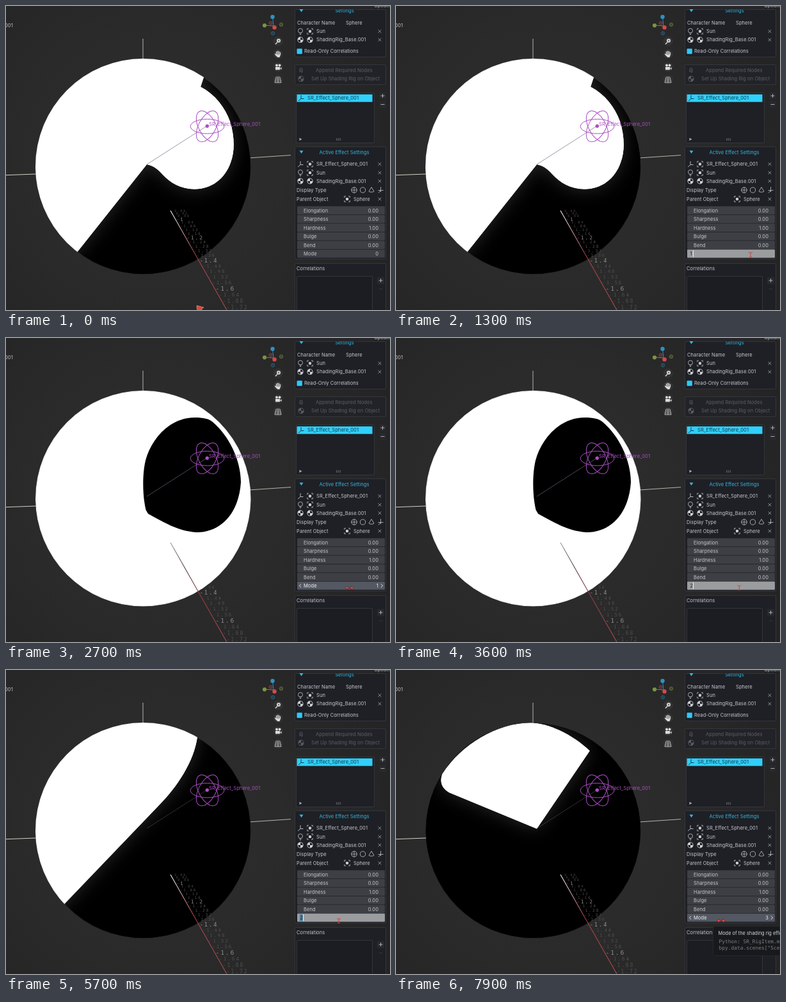
Animation of 600 by 474 pixels, one loop 8000 ms. Source, as an HTML page:

```html
<!DOCTYPE html>
<html lang="en">
<head>
<meta charset="utf-8">
<title>Shading rig modes</title>
<style>
html, body { margin: 0; width: 100%; height: 100%; overflow: hidden; background: #292929; }
svg { display: block; width: 600px; height: 474px; }
text { font: 7.5px Inter, "Open Sans", sans-serif; letter-spacing: .09px; fill: #c6c8cc; white-space: pre; }
.mono { font-family: "DejaVu Sans Mono", monospace; font-size: 7.9px; letter-spacing: 0; fill: #7c7f84; }
.ruler { font-family: "DejaVu Sans Mono", monospace; letter-spacing: 1.9px; }
.lit { filter: drop-shadow(0 0 .6px #fff) drop-shadow(0 0 14px rgba(255, 255, 255, .16)); }
</style>
</head>
<body>
<svg id="stage" viewBox="0 0 600 474" xmlns="http://www.w3.org/2000/svg">
  <defs>
    <radialGradient id="back" gradientUnits="userSpaceOnUse" cx="235" cy="240" r="390">
      <stop offset="0" stop-color="#2f2f2f"/><stop offset=".55" stop-color="#2a2a2a"/><stop offset="1" stop-color="#242425"/>
    </radialGradient>
    <linearGradient id="axis" gradientUnits="userSpaceOnUse" x1="257" y1="319" x2="345" y2="474">
      <stop offset="0" stop-color="#fff"/><stop offset=".2" stop-color="#d0a0a0"/>
      <stop offset=".42" stop-color="#a34247"/><stop offset="1" stop-color="#a84c50"/>
    </linearGradient>
    <linearGradient id="axisDark" gradientUnits="userSpaceOnUse" x1="257" y1="319" x2="345" y2="474">
      <stop offset="0" stop-color="#999"/><stop offset=".25" stop-color="#4c4044"/>
      <stop offset=".5" stop-color="#8d3c42"/><stop offset="1" stop-color="#a84c50"/>
    </linearGradient>
    <clipPath id="ball"><circle cx="214.3" cy="250.2" r="168.3"/></clipPath>
  </defs>
</svg>
<script>
const LOOP = 8000;
const stage = document.getElementById("stage");
const CYAN = "#36b8e0", PURPLE = "#a950c2", GREY = "#b4b6ba";

function add(tag, attrs, parent = stage, content) {
  const el = document.createElementNS("http://www.w3.org/2000/svg", tag);
  for (const k in attrs) el.setAttribute(k, attrs[k]);
  if (content !== undefined) el.textContent = content;
  parent.appendChild(el);
  return el;
}
const group = (parent = stage) => add("g", {}, parent);
const rect = (x, y, width, height, fill, more, parent) => add("rect", { x, y, width, height, fill, ...more }, parent);
const disc = (cx, cy, r, fill, more, parent) => add("circle", { cx, cy, r, fill, ...more }, parent);
const path = (d, stroke, more, parent) => add("path", { d, stroke, fill: "none", ...more }, parent);
const label = (x, y, s, more, parent) => add("text", { x, y, ...more }, parent, s);
const show = (el, on) => el.setAttribute("visibility", on ? "visible" : "hidden");

// Viewport and sphere
rect(0, 0, 600, 474, "url(#back)");
path("M214 51V82", "#b4b4b0");
path("M0 263.7L47 262", "#d0d1c6");
path("M381 236.900L445 232.600", "#b5b8aa");
label(-2, 32.5, "001", { fill: "#c4c4c4" });

const ball = add("g", { "clip-path": "url(#ball)" });
const base = disc(214.3, 250.2, 168.3, "#000", {}, ball);
const shades = [
  "M312 104L309 111L304 126C327 138 342 158 350 180C357 202 358 226 351 244C342 270 320 286 294 285.5C272 285 257 276 244 262C235 252 229 249 220 247L111 384L20 420V60H300Z",
  "M218.500 268C213 245 213 212 218 191C227 158 255 124 295 124C309 124 317 126 323 131C348 152 367 190 367 225C364 272 337 303 298 303C268 301 244 286 222 274Z",
  "M299 104C294 142 268 182 237 213L91 365L20 400V40H300Z",
  "M220 247.500L302.700 126C275 100 238 82.500 209 82.500C158 83 102 116 72.500 162C68 174 71 184 83 191Z"
].map((d, i) => path(d, "none", i === 1 ? { fill: "#000" } : { fill: "#fff", class: "lit" }, ball));
const rim = disc(214.3, 250.2, 167.9, "none", { stroke: "#bbb", "stroke-width": .7 });

// Perspective ruler
const axis = path("M257 319L345 474", "url(#axis)", { "stroke-width": 1.1 });
const marks = group();
marks.style.mixBlendMode = "lighten";
for (let k = 0; k <= 21; k++) {
  const y = 319 + 4 * k + .153 * k * k, x = 257 + (y - 319) * .568;
  const v = (88 + 4 * k) / 100, major = (88 + 4 * k) % 20 === 0;
  const size = (major ? 6.5 : 4.6) + k * .17;
  add("text", {
    x: x + 1.5, y: y + size * .36, class: "ruler",
    style: `font-size:${size}px;fill:${major ? "#8c8c8c" : "#4e4e4e"}`
  }, marks, "-" + (major ? +v.toFixed(1) : v.toFixed(2)));
}

// Effect handle
const link = path("M220 247L314 187", "#6f6780", { "stroke-width": .8 });
for (const a of [0, 62, -62])
  add("ellipse", { cx: 314.5, cy: 187.7, rx: 26.3, ry: a ? 13.5 : 11.3, fill: "none", stroke: PURPLE, transform: `rotate(${a} 314.5 187.7)` });
disc(314.3, 187.2, 2.7, PURPLE);
label(317, 187.3, "SR_Effect_Sphere_001", { style: "fill:" + PURPLE });

// Navigation gizmo
path("M418 31L404 30", "#6f8b3a", { "stroke-width": 1.2 });
path("M418 31L416.500 17", "#2b80a8", { "stroke-width": 1.2 });
path("M418 31L420 34", "#c2484d", { "stroke-width": 1.2 });
disc(430, 29, 2.7, "#3d4a2a", { stroke: "#62783a", "stroke-width": .8 });
disc(417, 42.500, 2.7, "#24404f", { stroke: "#2c6583", "stroke-width": .8 });
disc(413.500, 26.500, 2.5, "#55302f", { stroke: "#8f4045", "stroke-width": .8 });
disc(404, 30.300, 3.1, "#789640");
disc(416.500, 17, 3.2, "#2f92c2");
disc(419.500, 33.500, 3.2, "#d4494f");

// Navigation buttons
for (const y of [55, 75, 95, 115]) disc(425, y, 7.6, "#323233");
disc(426, 54, 3, "#ddd");
path("M424 56.500L421 59.500", "#ddd", { "stroke-width": 1.5 });
path("M424.500 54H427.500M426 52.500V55.500", "#444", { "stroke-width": .8 });
path("M422.500 76V71.500M424.500 75V70.500M426.500 75V71M428.500 76V72.500M420.500 75L423 78", "#ddd", { "stroke-width": 1.3, "stroke-linecap": "round" });
path("M422 75.500H429L427.500 80H424Z", "none", { fill: "#ddd" });
disc(423, 92.500, 2, "#ddd");
disc(427.500, 92.500, 2, "#ddd");
path("M421 95H428V99.500H421ZM428 97L430.500 95.500V99.500Z", "none", { fill: "#ddd" });
path("M422 111H428L430 119.500H420ZM421.300 114H428.700M420.700 117H429.300M425 111V119.500", "#ccc", { "stroke-width": .8 });

// Sidebar
const PANEL = "#1e2026", EDGE = "#34363b";
const box = (x, y, w, h, fill = PANEL, r = 1.5) => rect(x + .5, y + .5, w - 1, h - 1, fill, { stroke: EDGE, rx: r });
const cross = y => path(`M581.500 ${y - 2.3}L586.300 ${y + 2.3}M586.300 ${y - 2.3}L581.500 ${y + 2.3}`, "#a7a9ad", { "stroke-width": .8 });
const plus = (x, y) => path(`M${x - 3} ${y}H${x + 3}M${x} ${y - 3}V${y + 3}`, "#bbb", { "stroke-width": .9 });

function bulb(x, y) {
  disc(x, y - 1, 3.5, "none", { stroke: GREY, "stroke-width": .9 });
  path(`M${x - 1.5} ${y + 3.3}H${x + 1.5}M${x - 1} ${y + 5}H${x + 1}`, GREY, { "stroke-width": .9 });
}
function object(x, y) {
  rect(x - 2, y - 2, 4, 4, "#c8c8c8");
  path(`M${x - 4.3} ${y - 2}V${y - 4.3}H${x - 2}M${x + 2} ${y - 4.3}H${x + 4.3}V${y - 2}M${x + 4.3} ${y + 2}V${y + 4.3}H${x + 2}M${x - 2} ${y + 4.3}H${x - 4.3}V${y + 2}`, GREY, { "stroke-width": .9 });
}
function material(x, y, c = "#d2d2d2") {
  disc(x, y, 4.1, "none", { stroke: c, "stroke-width": .9 });
  path(`M${x} ${y - 4}A4 4 0 0 0 ${x - 4} ${y}H${x}ZM${x} ${y}H${x + 4}A4 4 0 0 1 ${x} ${y + 4}Z`, "none", { fill: c });
}
function empty(x, y, c = GREY) {
  path(`M${x} ${y - 4.5}V${y + 1}H${x + 4.5}M${x} ${y + 1}L${x - 4} ${y + 4.5}`, c, { "stroke-width": 1 });
}
function lightRow(y) {
  bulb(460, y); object(475, y);
  label(485, y + 2.7, "Sun"); cross(y);
}
function materialRow(y) {
  material(460, y); material(475, y);
  label(485, y + 2.7, "ShadingRig_Base.001"); cross(y);
}
const fold = y => path(`M458.500 ${y - 2}H464.500L461.500 ${y + 2.5}Z`, "none", { fill: CYAN });

label(575, 2.3, "Options");
box(451, 5, 143, 75);
rect(450, 0, 126, 5, "#262628");
fold(7);
label(529, 10, "Settings", { "text-anchor": "middle", style: "fill:" + CYAN });
rect(510, 2, 40, 3.5, "#262628");
label(455, 28.7, "Character Name");
label(531, 28.7, "Sphere");
lightRow(39.5);
materialRow(52.7);
rect(454.5, 66.5, 8.3, 8.3, "#2fc8f7", { rx: 1 });
label(466, 73.3, "Read-Only Correlations");

box(451, 91, 143, 32, "#212328");
const DIM = { style: "fill:#5c5f64" };
path("M459 103V99A1.800 1.800 0 0 1 463 99V102.500A1 1 0 0 1 461 102.500V99.500", "#5c5f64", { "stroke-width": .9 });
label(484, 103.2, "Append Required Nodes", DIM);
material(461, 113.5, "#5c5f64");
label(477, 116.2, "Set Up Shading Rig on Object", DIM);

box(453, 135, 123, 79);
rect(454.5, 137.8, 118, 11.8, "#2fd0fb");
empty(461, 143.5, "#153d4c");
label(471, 146.4, "SR_Effect_Sphere_001", { style: "fill:#123a49" });
rect(583, 134.5, 11, 11, "#27292e", { rx: 1 });
rect(583, 148, 11, 11, "#27292e", { rx: 1 });
plus(588.5, 140);
path("M585.500 153.500H591.500", "#bbb", { "stroke-width": .9 });
path("M458.500 205.500L462.500 207.700L458.500 210Z", "none", { fill: "#aaa" });
path("M516 207H523M516 209H523", "#85888d", { "stroke-dasharray": "1.5 1.2" });

box(451, 219, 143, 176);
fold(227.5);
label(528.5, 230.7, "Active Effect Settings", { "text-anchor": "middle", style: "fill:" + CYAN });
empty(460, 246.5); object(475, 246.5);
label(485, 249.2, "SR_Effect_Sphere_001"); cross(246.5);
lightRow(260);
materialRow(273);
label(454, 290, "Display Type");
disc(544, 287, 4.3, "none", { stroke: GREY, "stroke-width": .9 });
path("M539.500 287H548.500M544 282.500V291.500", GREY, { "stroke-width": .8 });
disc(557.500, 287, 4.1, "none", { stroke: GREY, "stroke-width": .9 });
path("M571 282.500L575 289A4.500 2.200 0 0 1 567 289Z", GREY, { "stroke-width": .9 });
path("M585.500 282V287.500H589.500M585.500 287.500H581.500M585.500 287.500L582 291.500M585.500 287.500V290", GREY, { "stroke-width": .9 });
label(454, 303.7, "Parent Object");
object(533, 301);
label(543, 303.7, "Sphere"); cross(301);

const rowY = i => 312.3 + i * 13.5;
const RIGHT = { "text-anchor": "end" };
let modeBar, modeText, modeName;
[["Elongation", "0.00"], ["Sharpness", "0.00"], ["Hardness", "1.00"], ["Bulge", "0.00"], ["Bend", "0.00"], ["Mode", "0"]].forEach(([name, value], i) => {
  modeBar = rect(455, rowY(i), 137, 12.7, "#3d3f45", { rx: 1 });
  modeName = label(465, rowY(i) + 9.2, name);
  modeText = label(582, rowY(i) + 9.2, value, RIGHT);
});
const arrows = path("M461 383.500L458.500 386.200L461 389M586 383.500L588.500 386.200L586 389", "#ddd", {});

box(451, 401, 143, 80);
label(454, 412.3, "Correlations");
box(454, 421, 119, 60, "#1b1d22");
rect(580, 422.5, 11, 11, "#27292e", { rx: 1 });
plus(585.5, 428);
path("M583 441H588", "#45484e", { "stroke-dasharray": "1 1" });

// Value being typed
const edit = group();
rect(455, 379.8, 137, 12.7, "#9b9c9e", { rx: 1 }, edit);
const picked = rect(459, 381, 5, 10.5, "#4f7f9f", {}, edit);
const typed = label(459.5, 389, "", { style: "fill:#222" }, edit);
rect(464, 381, 1, 10.5, "#f2f2f2", {}, edit);

// Tooltip
const tip = group();
rect(495.500, 399.500, 120, 46, "#17191c", { rx: 3, stroke: "#26282c" }, tip);
label(503.5, 412.5, "Mode of the shading rig effect", { style: "fill:#d2d3d5;letter-spacing:0;font-size:7.4px" }, tip);
label(504.5, 426, "Python: SR_RigItem.mode", { class: "mono" }, tip);
label(504.5, 436.3, "bpy.data.scenes[\"Scene\"]", { class: "mono" }, tip);

// Pointer shapes, drawn around 0,0
const pointers = {
  arrow: path("M-5 -4L6 -1L2.500 1.500L5 6L2 8L-1 3L-4 5Z", "#f0b0a0", { fill: "#e2452f", "stroke-width": .6 }),
  drag: path("M-6.500 0L-3 -2.500V-1H-1V1H-3V2.500ZM6.500 0L3 -2.500V-1H1V1H3V2.500Z", "#5a1a18", { fill: "#ee4a48", "stroke-width": .5 }),
  beam: path("M-3 -3.500Q0 -3.500 0 -1.500Q0 -3.500 3 -3.500M0 -2V3.500M-2 3.500H2", "#cc4540", { "stroke-width": 1 })
};

// [time, mode, value in the open field or null]
const steps = [
  [0, 0, null], [1000, 0, "0"], [1200, 0, "1"], [1500, 1, null],
  [3200, 1, "1"], [3500, 1, "2"], [3900, 2, null],
  [5500, 2, "2"], [5800, 2, "3"], [6100, 3, null]
];
// [time, x, y]
const route = [
  [0, 303, 471], [600, 554, 387.5], [1900, 554, 387.5], [2800, 536, 389.5],
  [4700, 537, 389], [5400, 520, 391], [6500, 520, 391], [6900, 508, 391], [8000, 508, 391]
];

function pointAt(t) {
  const i = route.findIndex(p => p[0] > t);
  const [a, b] = [route[i - 1], route[i]];
  const u = (t - a[0]) / (b[0] - a[0]), e = u * u * (3 - 2 * u);
  return [a[1] + (b[1] - a[1]) * e, a[2] + (b[2] - a[2]) * e];
}

function draw(t) {
  const [, mode, value] = steps.filter(s => s[0] <= t).pop();
  const [x, y] = pointAt(t);
  const hover = x > 455 && y < 393;
  const editing = value !== null;

  base.setAttribute("fill", mode === 1 ? "#fff" : "#000");
  shades.forEach((s, i) => show(s, i === mode));
  axis.setAttribute("stroke", mode === 1 ? "url(#axisDark)" : "url(#axis)");
  link.setAttribute("opacity", mode < 2 ? .85 : .55);
  rim.setAttribute("opacity", mode === 1 ? .5 : .12);

  modeBar.setAttribute("fill", hover ? "#535862" : "#3d3f45");
  modeText.textContent = mode;
  modeName.style.fill = modeText.style.fill = hover ? "#f0f0f0" : "#c6c8cc";
  show(arrows, hover && !editing);

  show(edit, editing);
  typed.textContent = value || "";
  picked.setAttribute("opacity", editing && +value === mode ? 1 : 0);

  show(tip, t >= 7600);
  const kind = editing ? "beam" : hover ? "drag" : "arrow";
  for (const k in pointers) {
    show(pointers[k], k === kind);
    pointers[k].setAttribute("transform", `translate(${x} ${y})`);
  }
}

const t0 = performance.now();
function tick() {
  draw((performance.now() - t0) % LOOP);
  requestAnimationFrame(tick);
}
tick();
</script>
</body>
</html>
```
